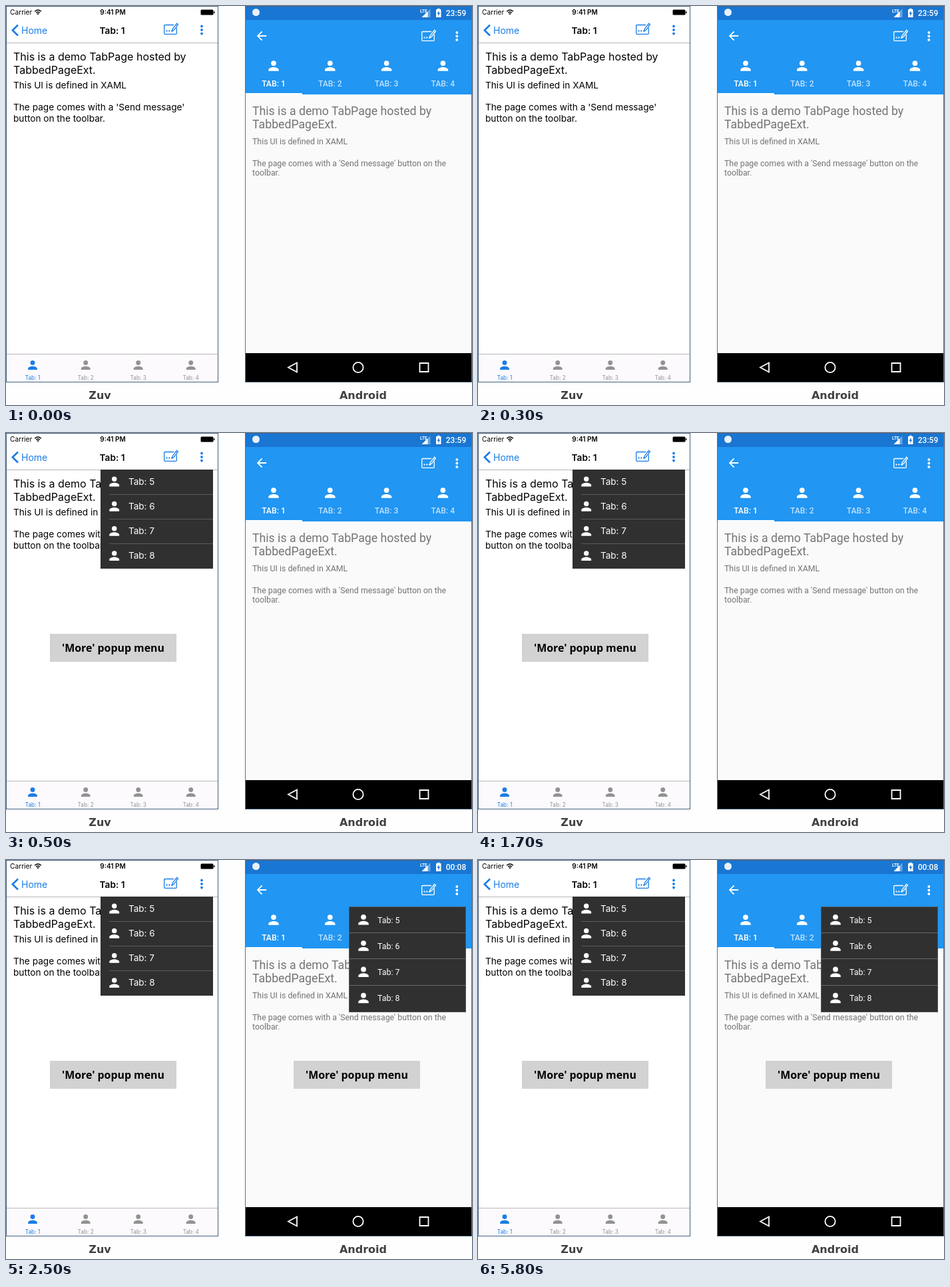
Write an HTML page that moves like this. It is 700 px wide and 600 px high and loops after 8000 ms.

```html
<!DOCTYPE html>
<html lang="en">
<head>
<meta charset="utf-8">
<title>Tabbed page with popup menu</title>
<style>
  html, body { margin: 0; width: 100%; height: 100%; overflow: hidden; background: #fefefe; }
  svg { display: block; width: 700px; height: 600px; }
  text { white-space: pre; }
  .left { font-family: Inter, sans-serif; }
  .right { font-family: Roboto, sans-serif; }
  .caption { font: bold 16px "DejaVu Sans", sans-serif; fill: #404040; text-anchor: middle; }
  .note { font: bold 15.9px "Open Sans", sans-serif; text-anchor: middle; }
  .mid { text-anchor: middle; }
  .line { fill: none; stroke: currentColor; }
</style>
</head>
<body>
<svg viewBox="0 0 700 600" xmlns="http://www.w3.org/2000/svg">
  <defs>
    <path id="person" fill="currentColor" d="M0 0a4 4 0 1 0 0-8a4 4 0 0 0 0 8zm0 2c-2.67 0-8 1.34-8 4v2h16v-2c0-2.66-5.33-4-8-4z"/>
    <g id="dots" fill="currentColor">
      <circle cy="-5.5" r="1.9"/><circle r="1.9"/><circle cy="5.5" r="1.9"/>
    </g>
    <g id="compose">
      <path class="line" stroke-width="1.3" d="M15 3.5H2Q.7 3.5 .7 4.8V16Q.7 17.4 2 17.4H18Q19.3 17.4 19.3 16V7.5"/>
      <path class="line" stroke-width="1.2" d="M12.5 12.6L13.2 9.6L19.6 1.2L21.6 2.8L15.2 11.2ZM18 3.3L20 4.9"/>
      <path fill="currentColor" d="M3.5 11.4h2v2h-2zM7.3 11.4h2v2h-2zM11.2 11.4h2.4v2h-2.4z"/>
    </g>
  </defs>

  <g class="left" fill="#000">
    <rect x=".5" y=".5" width="318" height="565" fill="#fff" stroke="#45627f"/>
    <path fill="#fcfafd" d="M1 524h317v41H1z"/>
    <path fill="#b9b9bb" d="M1 55h317v1H1zM1 523h317v1H1z"/>

    <text x="6" y="13" font-size="10.2">Carrier</text>
    <g class="line" stroke="#000" stroke-width="1.5">
      <path d="M43.2 8.2Q48 3.8 52.8 8.2M45.2 10.3Q48 7.8 50.8 10.3"/>
    </g>
    <path d="M46.3 11.4Q48 10 49.7 11.4L48 13.2z"/>
    <text class="mid" x="160.5" y="13" font-size="10" font-weight="600">9:41 PM</text>
    <rect x="292.5" y="5.5" width="19" height="8" rx="1.5"/>
    <rect x="312" y="8" width="1.5" height="3" rx=".7"/>

    <g color="#1a7de6">
      <path class="line" stroke-width="2.6" d="M18 28.5L9.8 36.5L18 44.5"/>
      <text x="23" y="41.5" font-size="14" fill="currentColor">Home</text>
      <use href="#compose" x="237" y="25"/>
      <use href="#dots" x="294" y="36"/>
    </g>
    <text class="mid" x="159.5" y="41.5" font-size="13.6" font-weight="600">Tab: 1</text>

    <g font-size="16">
      <text x="11" y="82">This is a demo TabPage hosted by</text>
      <text x="11" y="102">TabbedPageExt.</text>
    </g>
    <g font-size="13.65">
      <text x="11" y="124">This UI is defined in XAML</text>
      <text x="11" y="157">The page comes with a 'Send message'</text>
      <text x="11" y="174">button on the toolbar.</text>
    </g>
    <g id="leftTabs" font-size="8.3"></g>
    <g id="leftMenu" font-size="13.5"></g>
  </g>

  <g class="right" fill="#fff" color="#fff">
    <path fill="#fafafa" d="M360 133h339v389H360z"/>
    <path fill="#2196f3" d="M360 20h339v113H360z"/>
    <path fill="#1976d2" d="M360 0h339v21H360z"/>
    <path fill="#000" d="M360 522h339v44H360z"/>

    <circle cx="375.5" cy="9.5" r="5.5" fill="#e8f1fa"/>
    <text x="622" y="9.5" font-size="6.6" font-weight="700">LTE</text>
    <path opacity=".35" d="M637.5 4V17H624.5z"/>
    <path d="M633.5 8V17H624.5z"/>
    <path d="M648 5V3.8h3.5V5H653.5V17H646V5z"/>
    <path fill="#1976d2" d="M650.6 7.2L647.4 11.8H649.4V15L652.2 10.4H650.6z"/>
    <g id="clock" class="mid" font-size="12" font-weight="500"></g>

    <path transform="translate(373.2 34.2) scale(.9)" d="M20 11H7.83l5.59-5.59L12 4l-8 8 8 8 1.41-1.41L7.83 13H20z"/>
    <use href="#compose" x="624" y="35"/>
    <use href="#dots" x="677.3" y="45.5"/>
    <path d="M360 131h85v2h-85z"/>

    <g fill="#747474">
      <g font-size="17.7">
        <text x="370" y="163.5">This is a demo TabPage hosted by</text>
        <text x="370" y="184">TabbedPageExt.</text>
      </g>
      <g font-size="12.33">
        <text x="370" y="207.5">This UI is defined in XAML</text>
        <text x="370" y="240.5">The page comes with a 'Send message' button on the</text>
        <text x="370" y="255">toolbar.</text>
      </g>
    </g>
    <g id="rightTabs" font-size="12.2" font-weight="500"></g>

    <g class="line" stroke-width="1.8">
      <path d="M437 536.5V550.5L424 543.5z"/>
      <circle cx="529" cy="543.5" r="7.6"/>
      <path d="M621.5 537h13v13h-13z"/>
    </g>
    <path class="line" color="#45627f" d="M359.5 0V566M699.5 0V566M359 565.5H700M359 .5H700" stroke-opacity=".9"/>
    <g id="rightMenu" font-size="12.4"></g>
  </g>

  <text class="caption" x="141" y="591">Zuv</text>
  <text class="caption" x="536.5" y="591">Android</text>
</svg>
<script>
  const LOOP = 8000;
  const $ = id => document.getElementById(id);

  const person = (x, y, scale) =>
    `<use href="#person" transform="translate(${x} ${y}) scale(${scale})"/>`;

  const tabs = (prefix, centers, iconY, scale, textY, active, idle, idleOpacity) =>
    centers.map((x, i) => {
      const color = i ? idle : active;
      return `<g color="${color}" fill="${color}">${person(x, iconY, scale)}
        <text class="mid" x="${x}" y="${textY}" fill-opacity="${i ? idleOpacity : 1}">${prefix}: ${i + 1}</text></g>`;
    }).join("");

  const note = x =>
    `<rect x="${x}" y="302" width="190" height="42" fill="#d2d2d2"/>
     <text class="note" x="${x + 95}" y="329" fill="#000">'More' popup menu</text>`;

  function menu({ x, y, w, h, row, first, icon, scale, label, rule, ruleX, ruleColor, edge }) {
    const rows = [0, 1, 2, 3].map(i => {
      const cy = first + i * row;
      const line = i < 3
        ? `<rect x="${ruleX}" y="${Math.round(rule + i * row)}" width="${x + w - ruleX}" height="1" fill="${ruleColor}"/>` : "";
      return `${person(icon, cy, scale)}<text x="${label}" y="${cy + 4.8}">Tab: ${i + 5}</text>${line}`;
    }).join("");
    return `<rect x="${x}" y="${y}" width="${w}" height="${h}" fill="#303030"/>
      ${edge ? `<rect x="${x + .5}" y="${y + .5}" width="${w - 1}" height="${h - 1}" fill="none" stroke="${edge}"/>` : ""}
      <g fill="#fff" color="#fff">${rows}</g>`;
  }

  $("leftTabs").innerHTML = tabs("Tab", [40, 119.7, 198.7, 277.7], 540, .86, 562, "#1a7de6", "#929292", 1);
  $("rightTabs").innerHTML = tabs("TAB", [402, 486.8, 571.6, 656.4], 90, .97, 121, "#fff", "#fff", .7);

  $("leftMenu").innerHTML = note(66) + menu({
    x: 142, y: 55, w: 169, h: 149, row: 37.2, first: 73, icon: 162.7, scale: .93,
    label: 184, rule: 91.6, ruleX: 155, ruleColor: "#5c5c5c"
  });
  $("rightMenu").innerHTML = note(432) + menu({
    x: 515, y: 70, w: 176, h: 159, row: 39.3, first: 89.7, icon: 537, scale: .97,
    label: 558, rule: 109, ruleX: 515, ruleColor: "#686868", edge: "#555"
  });
  $("clock").innerHTML = ["23:59", "00:08"].map((t, i) =>
    `<text id="time${i}" x="676" y="15">${t}</text>`).join("");

  // [element, visible from ms, visible until ms]
  const steps = [
    ["leftMenu", 500, LOOP],
    ["rightMenu", 2500, LOOP],
    ["time0", 0, 2500],
    ["time1", 2500, LOOP]
  ];
  for (const [id, from, to] of steps) {
    const frames = [{ offset: 0, opacity: from ? 0 : 1 }];
    if (from) frames.push({ offset: from / LOOP, opacity: 1 });
    if (to < LOOP) frames.push({ offset: to / LOOP, opacity: 0 });
    frames.push({ offset: 1, opacity: to < LOOP ? 0 : 1 });
    frames.forEach(f => f.easing = "step-end");
    $(id).animate(frames, { duration: LOOP, iterations: Infinity });
  }
</script>
</body>
</html>
```
